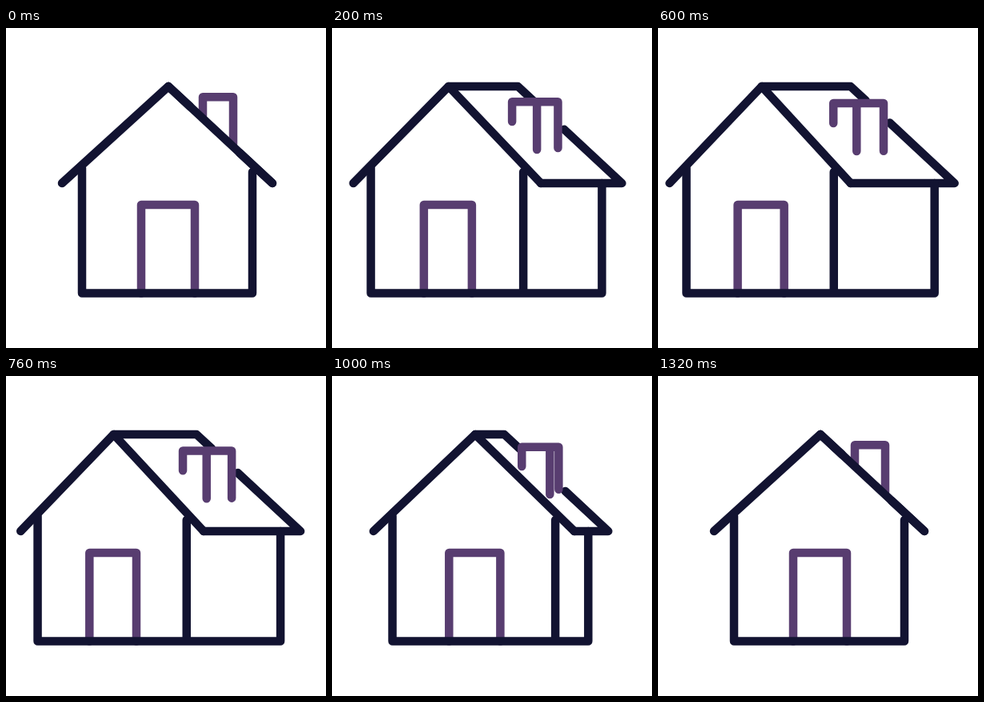
These frames come from a looping animation (400 px wide and 400 px high, 1.4 s). An HTML page:

```html
<!DOCTYPE html>
<html lang="en">
<head>
<meta charset="utf-8">
<title>House turn</title>
<style>
  html, body { margin: 0; width: 100%; height: 100%; overflow: hidden; background: #fff; }
  svg { display: block; width: 100%; height: 100%; }
  path { fill: none; stroke: #121331; stroke-width: 10.5; stroke-linecap: round; stroke-linejoin: round; }
  .accent { stroke: #583d70; }
</style>
</head>
<body>
<svg viewBox="0 0 400 400">
  <path id="back">
  </path>
  <path id="chimney" class="accent"></path>
  <path id="door" class="accent"></path>
  <path id="walls"></path>
  <path id="front"></path>
</svg>
<script>
const LOOP = 1400, STEP = 40;
const RIDGE = 73, EAVE = 194, BASE = 331.5;
const SLOPE = (EAVE - RIDGE) / 130;

// Cubic easing with control points (a, 0) and (b, 1)
const ease = (a, b) => u => {
  if (u <= 0) return 0;
  if (u >= 1) return 1;
  let lo = 0, hi = 1;
  for (let i = 0; i < 24; i++) {
    const s = (lo + hi) / 2, r = 1 - s;
    if (3 * a * s * r * r + 3 * b * s * s * r + s ** 3 < u) lo = s; else hi = s;
  }
  return lo * lo * (3 - 2 * lo);
};
const turnOut = ease(0.2, 0.1);
const turnBack = ease(0.85, 0.38);
const turnAt = t => t < 500 ? turnOut(t / 482) : 1 - turnBack((t - 500) / 790);

// Joins points given as x, y, x, y, ... into one polyline
const line = (...v) => {
  let d = '';
  for (let i = 0; i < v.length; i += 2) {
    d += (i ? 'L' : 'M') + v[i].toFixed(2) + ' ' + v[i + 1].toFixed(2);
  }
  return d;
};
const set = (id, ...lines) => document.getElementById(id).setAttribute('d', lines.join(''));

function draw(p) {
  const mix = (a, b) => a + (b - a) * p;
  const apex = mix(203, 129), ridge = mix(203, 241);
  const eave = mix(333, 240), backEave = mix(333, 371);
  const left = mix(95, 35), corner = mix(308, 219), right = mix(308, 346);

  // Far roof edge is broken where the chimney stands
  const cut = 19 + 8 * (1 - p) ** 3;
  const resume = mix(292.5, 289.5);
  set('back',
    line(apex, RIDGE, ridge, RIDGE, ridge + cut, RIDGE + cut * SLOPE),
    line(resume, RIDGE + (resume - ridge) * SLOPE, backEave, EAVE, eave, EAVE));

  const top = mix(86.3, 94), c1 = mix(246, 219), c2 = mix(284, 248), c3 = mix(284, 282);
  set('chimney',
    line(c1, mix(110, 119), c1, top, c3, top, c3, mix(136, 154)),
    line(c2, top, c2, mix(145, 154)));

  const d1 = mix(169, 99), d2 = mix(236, 157);
  set('door', line(d1, BASE, d1, 221, d2, 221, d2, BASE));

  set('walls',
    line(left, 175, left, BASE, right, BASE, right, EAVE),
    line(corner, 180, corner, BASE));

  set('front', line(mix(70, 14), EAVE, apex, RIDGE, eave, EAVE));
}

function tick() {
  const t = performance.now() % LOOP;
  draw(turnAt(Math.floor(t / STEP) * STEP));
  requestAnimationFrame(tick);
}
tick();
</script>
</body>
</html>
```
